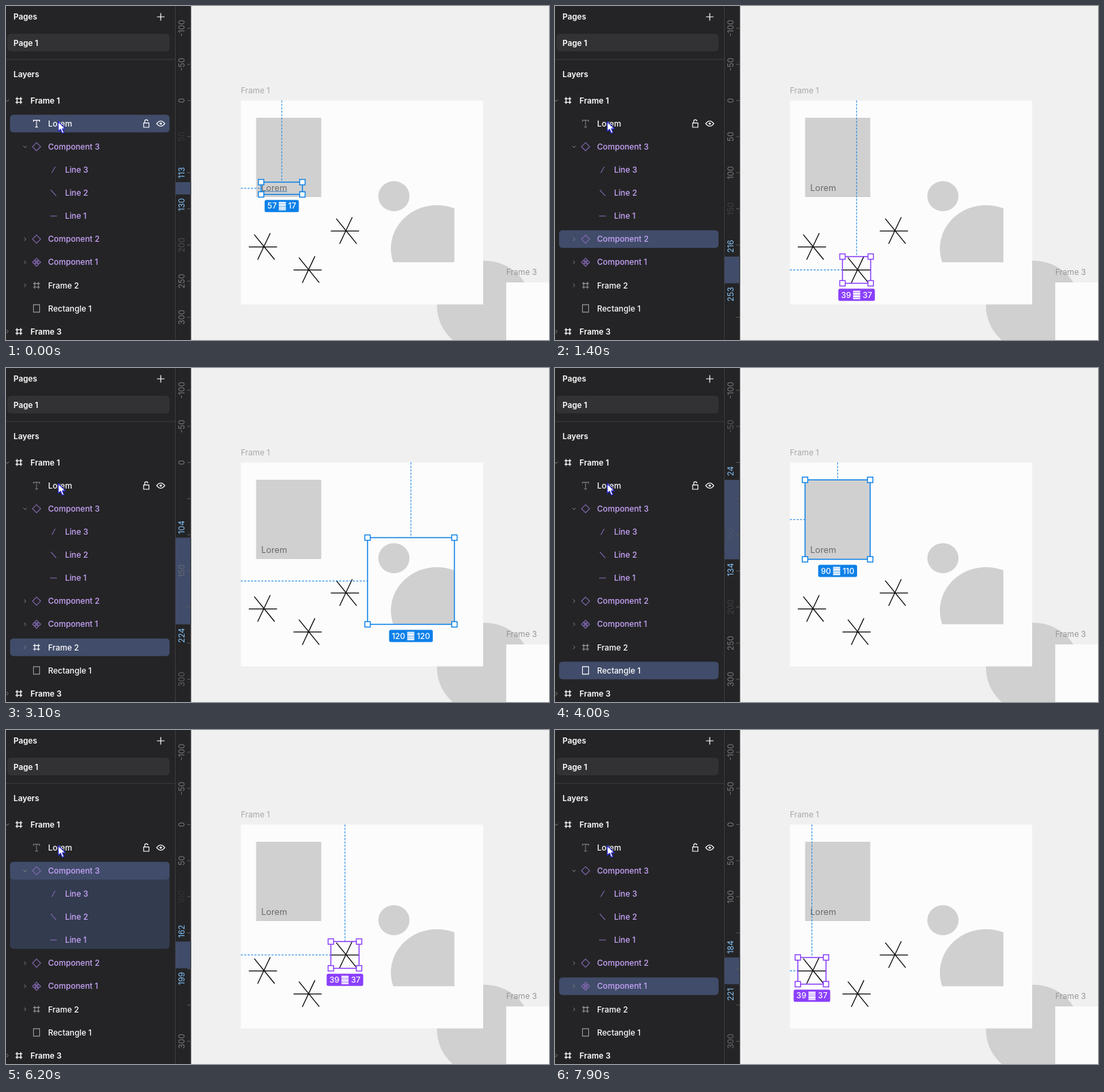
An HTML page for the animation above (8000 ms loop, 800 px wide and 493 px high).

```html
<!DOCTYPE html>
<html lang="en">
<head>
<meta charset="utf-8">
<title>Layer selection</title>
<style>
html, body { margin: 0; width: 100%; height: 100%; overflow: hidden; background: #f0f0f0; }
svg { display: block; width: 800px; height: 493px; font: 11.75px Inter, "Open Sans", sans-serif; }
.bold { font-weight: 600; fill: #fff; }
.layer { font-weight: 500; }
</style>
</head>
<body>
<svg id="stage" viewBox="0 0 800 493"></svg>
<script>
const LOOP = 8000, STEP = 900, FIRST = 250;
const ORIGIN = { x: 346, y: 139.5 }, ZOOM = 1.0665;
const BLUE = '#0c80e8', PURPLE = '#8a3ffc', LILAC = '#c9a6fb';
const SELECTED = '#404c69', GREY = '#d0d0d0', PANEL = '#242426';
const stage = document.getElementById('stage');

function add(tag, attrs, parent = stage, content) {
  const node = document.createElementNS('http://www.w3.org/2000/svg', tag);
  set(node, attrs);
  if (content !== undefined) node.textContent = content;
  return parent.appendChild(node);
}
function set(node, attrs) {
  for (const key in attrs) node.setAttribute(key, attrs[key]);
}
const group = (attrs = {}, parent) => add('g', attrs, parent);
const box = (x, y, width, height, fill, more = {}, parent) =>
  add('rect', { x, y, width, height, fill, ...more }, parent);
const text = (x, y, content, attrs = {}, parent) => add('text', { x, y, ...attrs }, parent, content);
const path = (d, stroke, width = 1, parent, more = {}) =>
  add('path', { d, fill: 'none', stroke, 'stroke-width': width, ...more }, parent);
const toX = value => ORIGIN.x + value * ZOOM;
const toY = value => ORIGIN.y + value * ZOOM;
const rowY = row => 173.6 + row * 34.1;

// Selection order, positions in frame units
const items = [
  { row: 0, x: 28, y: 113, w: 57, h: 17, color: BLUE },
  { row: 1, x: 124.3, y: 162, w: 39, h: 37, color: PURPLE, children: 3 },
  { row: 5, x: 72.7, y: 216, w: 39, h: 37, color: PURPLE },
  { row: 6, x: 11, y: 184, w: 39, h: 37, color: PURPLE },
  { row: 7, x: 175, y: 104, w: 120, h: 120, color: BLUE },
  { row: 8, x: 21, y: 24, w: 90, h: 110, color: BLUE }
];

// Canvas
box(272, 0, 528, 493, '#f0f0f0');
add('ellipse', { cx: 704.5, cy: 443, rx: 69.5, ry: 67, fill: GREY });
box(346, 139.5, 357, 301, '#fcfcfc');
box(737, 408, 63, 85, '#fcfcfc');
text(346, 129, 'Frame 1', { fill: '#a8a8a8' });
text(737, 397, 'Frame 3', { fill: '#979797' });
box(368.5, 165, 96, 117, GREY);
add('ellipse', { cx: 571.5, cy: 280.7, rx: 23, ry: 22.2, fill: GREY });
const clip = add('clipPath', { id: 'inner' });
box(toX(175), toY(104), 128, 127.8, '#000', {}, clip);
add('ellipse', { cx: 635, cy: 358, rx: 68, ry: 64, fill: GREY, 'clip-path': 'url(#inner)' });
text(376, 272.5, 'Lorem', { fill: '#6c6c6c', 'font-size': 12.8 });
for (const { x, y } of items.slice(1, 4))
  path('M0 19.8H41.6M8 1.6L38 38.5M13 38.8L31.6 -.5', '#000', 1.25, undefined,
    { transform: `translate(${toX(x)} ${toY(y)})` });

// Selection overlay
const guides = path('', BLUE, 1, stage, { 'stroke-dasharray': '3 2' });
const underline = path('M376 273.8H414', '#4f86bf');
const outline = add('rect', { fill: 'none', 'stroke-width': 1.5 });
const handles = [0, 1, 2, 3].map(() => box(0, 0, 8, 8, '#fff', { 'stroke-width': 1.4 }));
const badge = box(0, 0, 0, 18, BLUE, { rx: 2.5 });
const sizeLabels = [0, 1].map(() => text(0, 0, '', { fill: '#fff', 'font-weight': 500 }));
const stripes = path('M0 1H10.5M0 3.6H10.5M0 6.2H10.5M0 8.8H10.5M0 11.4H10.5', '#fff', 2);

// Ruler
box(250, 0, 22.5, 493, PANEL);
const rulerRange = box(250, 0, 22.5, 0, SELECTED);
const rulerText = (content, anchor, fill) =>
  text(0, 0, content, { 'text-anchor': anchor, fill });
const place = (node, y) => set(node, { transform: `translate(262.7 ${y}) rotate(-90)` });
const marks = [];
for (let value = -100; value <= 300; value += 50) {
  const y = toY(value);
  const node = rulerText(value, 'middle', '#7b7b7d');
  place(node, y);
  path(`M267 ${y}H272`, '#5a5a5c');
  marks.push({ y, node });
}
const rangeLabels = ['start', 'end'].map(anchor => rulerText('', anchor, '#85c4fa'));
path('M272 0V493', '#3a3a3c');

// Side panel
box(0, 0, 249.5, 493, PANEL);
path('M249.5 0V493M0 79H249', '#3c3c3e');
text(11, 20.2, 'Pages', { class: 'bold' });
path('M222.5 16H233.5M228 10.5V21.5', '#fff', 1.2);
box(2, 41, 239, 26, '#323234', { rx: 5 });
text(11, 58.7, 'Page 1', { class: 'bold' });
text(11, 105.2, 'Layers', { class: 'bold' });
const childTint = box(6, 0, 235, 0, '#333b4f', { rx: 5 });
const highlight = box(6, 0, 235, 26, SELECTED, { rx: 5 });

const icons = {
  frame: 'M-5 -2.7H5M-5 2.7H5M-2.7 -5V5M2.7 -5V5',
  text: 'M-4.5 -2.5V-5H4.5V-2.5M0 -5V5M-2 5H2',
  diamond: 'M0 -6L6 0L0 6L-6 0Z',
  component: 'M0 -6L2.5 -3.5L0 -1L-2.5 -3.5ZM0 1L2.5 3.5L0 6L-2.5 3.5ZM-3.5 -2.5L-1 0L-3.5 2.5L-6 0ZM3.5 -2.5L6 0L3.5 2.5L1 0Z',
  slash: 'M-2.5 4.5L2.5 -4.5',
  backslash: 'M-4 -4.5L4 4.5',
  dash: 'M-5 0H5',
  rect: 'M-4.5 -5.5H4.5V5.5H-4.5Z'
};
const icon = (name, x, y, color, width = 1) =>
  path(icons[name], color, width, undefined, { transform: `translate(${x} ${y})` });
function chevron(x, y, open) {
  path(open ? 'M-2.5 -1.2L0 1.3L2.5 -1.2' : 'M-1.2 -2.5L1.3 0L-1.2 2.5', '#858588', 1, undefined,
    { transform: `translate(${x} ${y})` });
}

for (const [label, y, open] of [['Frame 1', 139.5, true], ['Frame 3', 480.5, false]]) {
  chevron(2, y, open);
  icon('frame', 19, y, '#fff', 1.3);
  text(36, y + 4.2, label, { class: 'bold' });
}
const layers = [
  ['Lorem', 'text'], ['Component 3', 'diamond', LILAC, 'open'],
  ['Line 3', 'slash', LILAC], ['Line 2', 'backslash', LILAC], ['Line 1', 'dash', LILAC],
  ['Component 2', 'diamond', LILAC, 'closed'], ['Component 1', 'component', LILAC, 'closed'],
  ['Frame 2', 'frame', '#fff', 'closed'], ['Rectangle 1', 'rect']
];
const layerIcons = layers.map(([label, shape, color = '#fff', fold], row) => {
  const y = rowY(row), x = label.startsWith('Line') ? 70 : 45;
  if (fold) chevron(28, y, fold === 'open');
  text(x + 17, y + 4.2, label, { class: 'layer', fill: color });
  return icon(shape, x, y, color === LILAC ? '#8469b3' : '#98989b', 1.1);
});

// Lock, eye and pointer
path('M202.8 172.6H210.6V179H202.8ZM204.4 172.6V170.2A2.3 2.3 0 0 1 209 170.2', '#fff', 1.1);
path('M222 173.6Q228 165.8 234 173.6Q228 181.4 222 173.6Z', '#fff', 1.1);
add('circle', { cx: 228, cy: 173.6, r: 1.7, fill: '#fff' });
path('M77 170.5V185L80.4 182L82.8 187.8L85.4 186.7L83 181.2H87.4Z', '#2222c8', 1.2, undefined,
  { fill: '#fff', 'stroke-linejoin': 'round' });

function showSelection(index) {
  const { row, x, y, w, h, color, children = 0 } = items[index];
  const left = toX(x), top = toY(y), width = w * ZOOM, height = h * ZOOM;
  const right = left + width, bottom = top + height;
  const midX = left + width / 2, midY = top + height / 2;

  set(highlight, { y: rowY(row) - 13 });
  set(childTint, { y: rowY(row) - 13, height: children ? 26 + children * 34.1 : 0 });
  set(layerIcons[0], { stroke: row === 0 ? '#fff' : '#77777a' });
  set(layerIcons[7], { stroke: row === 7 ? '#fff' : '#98989b' });
  set(layerIcons[8], { stroke: row === 8 ? '#fff' : '#98989b' });

  set(guides, { d: `M${midX} ${ORIGIN.y}V${top}M${ORIGIN.x} ${midY}H${left}` });
  set(underline, { visibility: row === 0 ? 'visible' : 'hidden' });
  set(outline, { x: left, y: top, width, height, stroke: color });
  handles.forEach((node, i) =>
    set(node, { x: (i % 2 ? right : left) - 4, y: (i < 2 ? top : bottom) - 4, stroke: color }));

  const widths = [w, h].map((size, i) => {
    sizeLabels[i].textContent = size;
    return sizeLabels[i].getComputedTextLength();
  });
  const total = widths[0] + widths[1] + 17, start = midX - total / 2;
  const badgeTop = bottom + 8;
  set(badge, { x: start - 4, y: badgeTop, width: total + 8, fill: color });
  set(sizeLabels[0], { x: start, y: badgeTop + 13.3 });
  set(sizeLabels[1], { x: start + widths[0] + 17, y: badgeTop + 13.3 });
  set(stripes, { transform: `translate(${start + widths[0] + 3} ${badgeTop + 3})` });

  set(rulerRange, { y: top, height });
  const centers = [top - 15, bottom + 15];
  rangeLabels[0].textContent = y;
  rangeLabels[1].textContent = y + h;
  place(rangeLabels[0], top - 5.5);
  place(rangeLabels[1], bottom + 5.5);
  for (const mark of marks) {
    const gap = Math.min(...centers.map(center => Math.abs(center - mark.y)));
    set(mark.node, { opacity: Math.max(0, Math.min(1, (gap - 46) / 28)) });
  }
}

let shown = -1;
function render(now) {
  const time = now % LOOP;
  const index = Math.floor((time - FIRST + STEP) / STEP) % items.length;
  if (index !== shown) showSelection(shown = index);
  requestAnimationFrame(render);
}
render(0);
</script>
</body>
</html>
```
